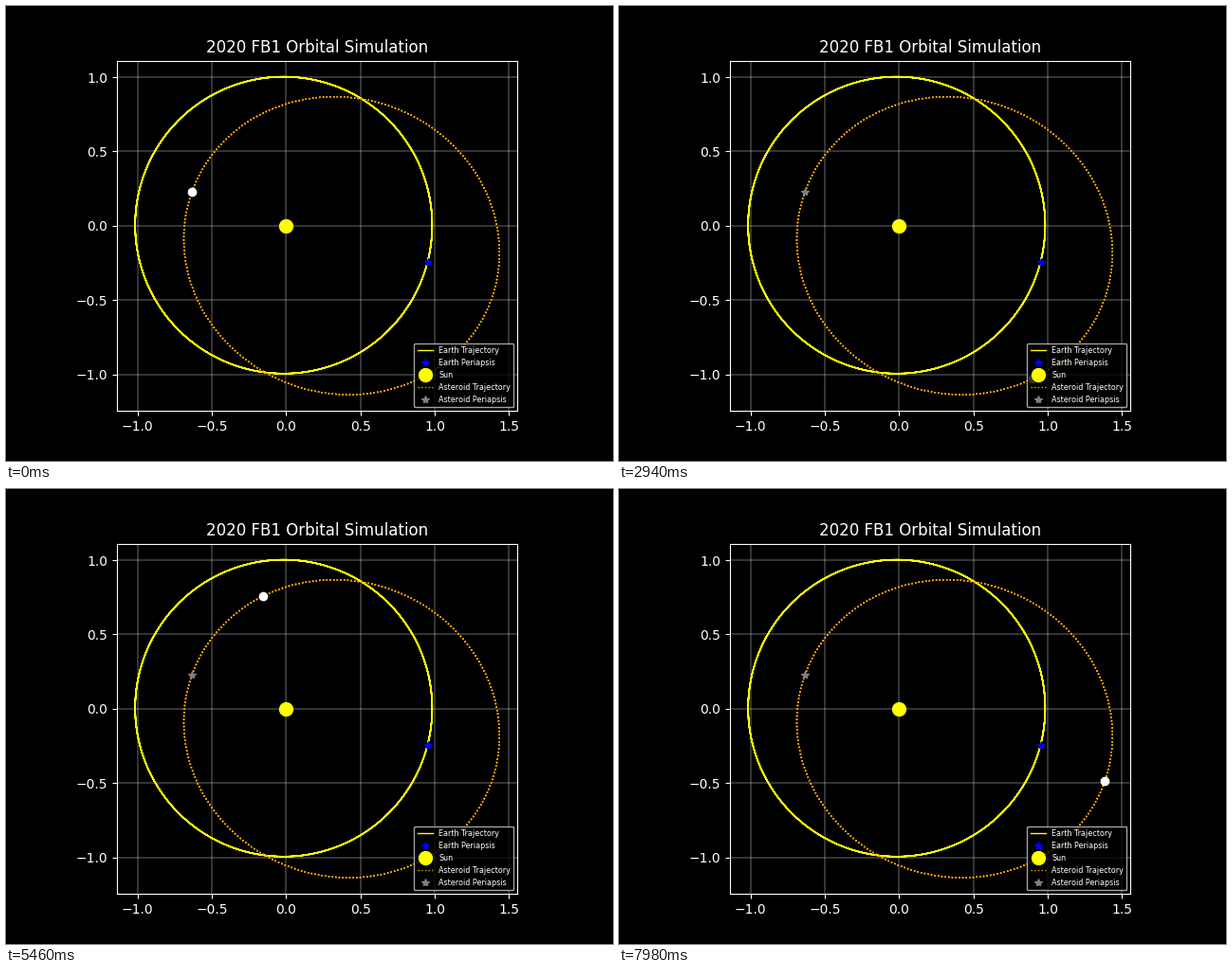
Recreate the animation shown at these times as a matplotlib script. Size 640 by 480 pixels, loop 8 s.

```python
import numpy as np
import matplotlib.pyplot as plt
from matplotlib.animation import FuncAnimation

LOOP_MS = 8000
FRAMES = 267
ASTEROID_PERIOD = 59.15   # frames per revolution
EARTH_PERIOD = 53.6
LAPS = 5

# semi-major axis, eccentricity, periapsis angle (degrees), direction
EARTH = (1.0, 0.0167, -14.4, 1)
ASTEROID = (1.07, 0.371, 160.25, -1)


def orbit(mean, a, e, angle, direction):
    """Position on a Kepler orbit around the origin for a mean anomaly."""
    mean = np.asarray(mean, dtype=float)
    ecc = mean + e * np.sin(mean)
    for _ in range(8):
        ecc = ecc - (ecc - e * np.sin(ecc) - mean) / (1 - e * np.cos(ecc))
    u = a * (np.cos(ecc) - e)
    v = direction * a * np.sqrt(1 - e * e) * np.sin(ecc)
    c, s = np.cos(np.radians(angle)), np.sin(np.radians(angle))
    return u * c - v * s, u * s + v * c


plt.style.use("dark_background")
fig, ax = plt.subplots(figsize=(6.4, 4.8), dpi=100)
ax.set_aspect("equal")
ax.set_xlim(-1.1392, 1.5564)
ax.set_ylim(-1.2461, 1.1115)
ax.set_title("2020 FB1 Orbital Simulation")
ax.grid(linewidth=0.3)

earth_mean = 2 * np.pi * np.arange(LAPS * EARTH_PERIOD) / EARTH_PERIOD
asteroid_mean = np.linspace(0, 2 * np.pi, 240)

ax.plot(*orbit(earth_mean, *EARTH), color="yellow", lw=1,
        label="Earth Trajectory")
ax.plot(*orbit([0], *EARTH), "*", color="blue", label="Earth Periapsis")
ax.plot([0], [0], "o", color="yellow", ms=10, label="Sun")
# each lap retraces the same dots and makes them denser
for lap in range(LAPS):
    ax.plot(*orbit(asteroid_mean, *ASTEROID), ":", color="orange", lw=1,
            label="_lap" if lap else "Asteroid Trajectory")
ax.plot(*orbit([0], *ASTEROID), "*", color="gray", label="Asteroid Periapsis")
body, = ax.plot(*orbit([0], *ASTEROID), "o", color="white")
ax.legend(loc="lower right", fontsize="xx-small")


def update(i):
    body.set_data(*orbit([2 * np.pi * i / ASTEROID_PERIOD], *ASTEROID))
    return body,


anim = FuncAnimation(fig, update, frames=FRAMES, interval=LOOP_MS / FRAMES,
                     repeat=True, repeat_delay=0)
plt.show()
```
